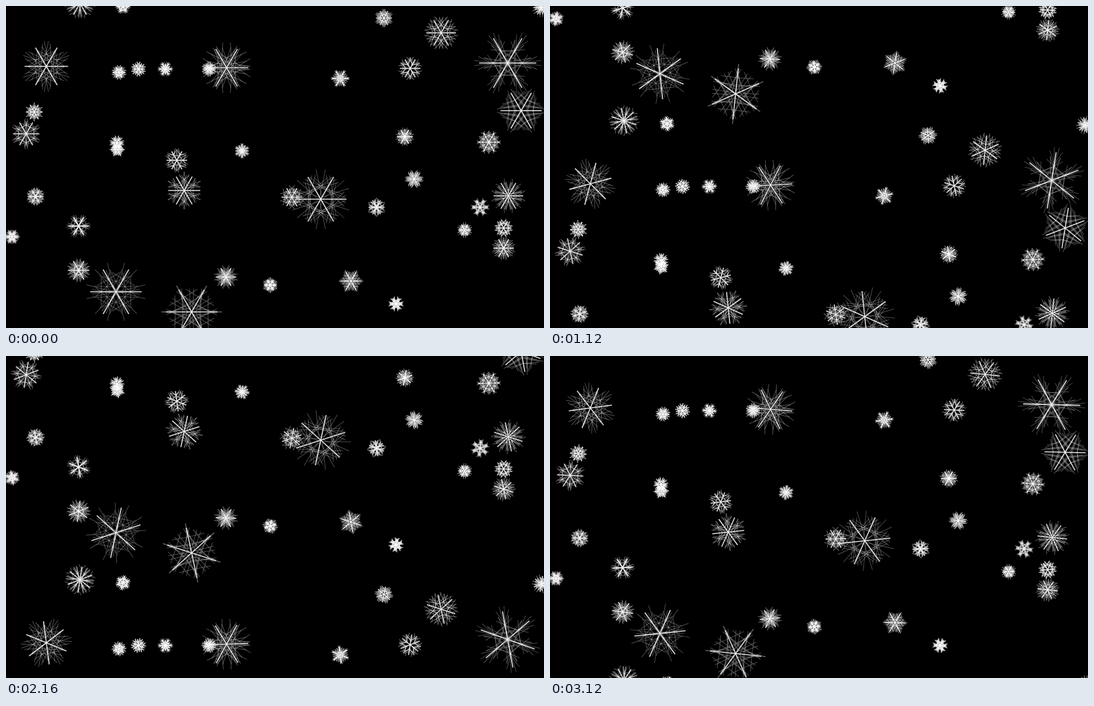
These frames come from a looping animation (800x480 px, 3200 ms). An HTML page with a canvas:

```html
<!DOCTYPE html>
<html lang="en">
<head>
<meta charset="utf-8">
<title>Snowflakes</title>
<style>
  html, body { margin: 0; width: 100%; height: 100%; overflow: hidden; background: #000; }
  canvas { display: block; }
</style>
</head>
<body>
<canvas id="stage" width="800" height="480"></canvas>
<script>
const ctx = document.getElementById('stage').getContext('2d');
const STEP = 80, STEPS = 40, FALL = 500, MARGIN = 10, TWIGS = 5;
const SIXTH = Math.PI / 3;

// Starting points by size; spin counts sixth-turns per loop and varies if left out
const groups = [
  { r: 50, spin: -1, at: [[746, 85]] },
  { r: 45, spin: 4, at: [[468, 288], [163.5, 426]] },
  { r: 45, spin: -4, at: [[276, 456]] },
  { r: 38, spin: 5, at: [[60, 90]] },
  { r: 38, spin: -3, at: [[328, 92]] },
  { r: 36, spin: -1, at: [[766, 156]] },
  { r: 28, spin: 4, at: [[265, 275]] },
  { r: 26, spin: -4, at: [[747, 283], [647, 40]] },
  { r: 23, spin: -2, at: [[30, 190.5], [110, -4]] },
  { r: 18, at: [[601, 93], [254, 230], [718, 203], [425, 285], [740, 361],
    [108, 328], [108, 394], [327, 404], [513, 410]] },
  { r: 14, at: [[562, 18], [796, 2.4], [497, 108], [42, 158], [593, 195],
    [607, 258], [551, 300], [705, 300], [740, 331], [44, 284]] },
  { r: 11.5, at: [[174, .5], [168, 99], [197, 94], [237, 94], [302, 94], [165, 204],
    [165.5, 214], [351, 216], [682, 334], [9, 344], [393, 416], [580, 444]] }
];

function random(seed) {
  return () => {
    seed = (seed * 16807) % 2147483647;
    return seed / 2147483647;
  };
}

function line(x1, y1, x2, y2) {
  const path = new Path2D();
  path.moveTo(x1, y1);
  path.lineTo(x2, y2);
  return path;
}

// One arm with mirrored twigs that cross the neighbouring arms
function makeFlake(x, y, r, spin, seed) {
  const rnd = random(seed * 7919 + 31);
  const twigs = [];
  for (let i = 0; i < TWIGS; i++) {
    const from = r * .55 * rnd();
    const reach = r * (i ? .65 + .3 * rnd() : 1);
    const a = SIXTH * (.2 + 1.2 * rnd());
    const tx = reach * Math.cos(a), ty = reach * Math.sin(a);
    twigs.push(line(from, 0, tx, ty), line(from, 0, tx, -ty));
  }
  return { x, y, spin, twigs, arm: line(0, 0, r * .85, 0), glow: .2 + 4 / r };
}

const flakes = [];
for (const { r, spin, at } of groups) {
  for (const [x, y] of at) {
    const i = flakes.length;
    const own = (i * 3 % 5 + 1) * (i % 2 ? 1 : -1);
    flakes.push(makeFlake(x, y, r, spin || own, i + 1));
  }
}

function strokeAll(paths, width, alpha) {
  ctx.lineWidth = width;
  ctx.strokeStyle = `rgba(255,255,255,${alpha})`;
  for (const path of paths) ctx.stroke(path);
}

function drawFlake(f, step) {
  const y = (f.y + step * FALL / STEPS + MARGIN) % FALL - MARGIN;
  ctx.setTransform(1, 0, 0, 1, f.x, y);
  ctx.rotate(step / STEPS * f.spin * SIXTH);
  for (let i = 0; i < 6; i++) {
    strokeAll(f.twigs, 1, f.glow);
    strokeAll([f.arm], 1.6, .85);
    ctx.rotate(SIXTH);
  }
}

function draw() {
  const step = Math.floor(performance.now() / STEP) % STEPS;
  ctx.setTransform(1, 0, 0, 1, 0, 0);
  ctx.fillStyle = '#000';
  ctx.fillRect(0, 0, 800, 480);
  for (const f of flakes) drawFlake(f, step);
  requestAnimationFrame(draw);
}
draw();
</script>
</body>
</html>
```
